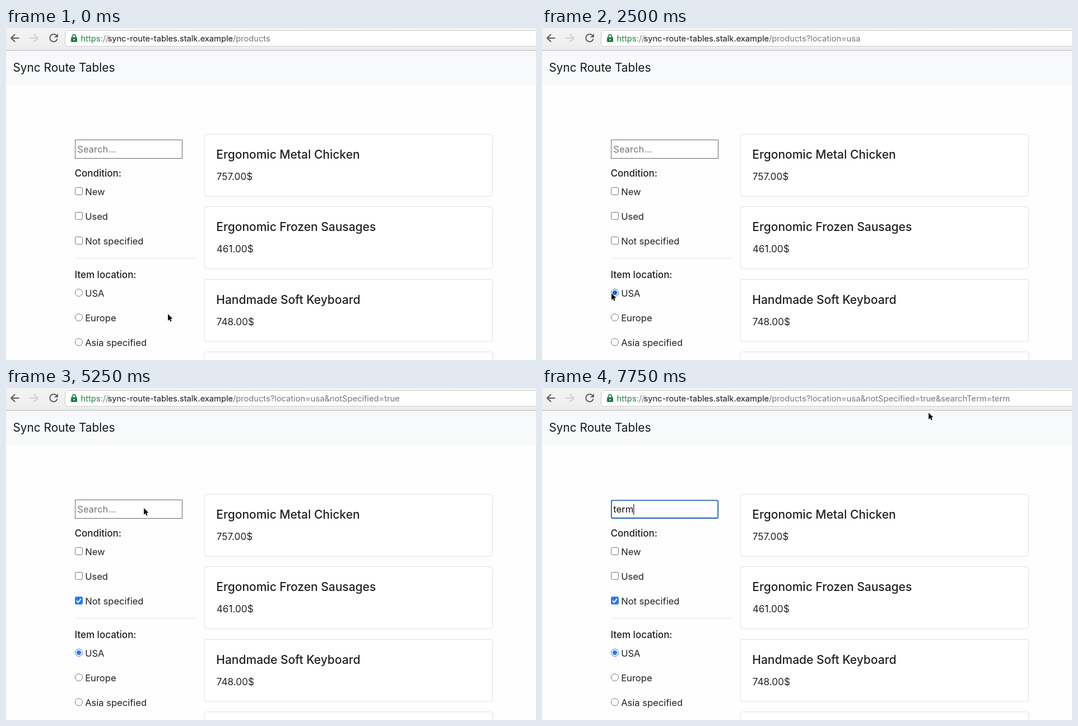
An HTML page that plays this animation: 946 px wide and 592 px high, repeating every 8 s.

```html
<!DOCTYPE html>
<html lang="en">
<head>
<meta charset="utf-8">
<title>Product filter</title>
<style>
  html, body { margin: 0; width: 100%; height: 100%; overflow: hidden; background: #fefefe; }
  svg { display: block; width: 946px; height: 592px; }
  text { font: 400 16.55px Inter, "Open Sans", sans-serif; font-optical-sizing: none; fill: #1d2125; white-space: pre; }
  .url { font-size: 14.66px; fill: #777; }
  .brand { font-size: 20.8px; fill: #151719; }
  .group { font-size: 17px; font-weight: 500; }
  .name { font-size: 21px; font-weight: 500; }
  .price { font-size: 17.2px; }
  .icon { fill: none; stroke: #5b5b5d; stroke-width: 2; }
</style>
</head>
<body>
<svg id="stage" viewBox="0 0 946 592">
  <defs>
    <linearGradient id="bar" x2="0" y2="1">
      <stop stop-color="#f4f3f4"/><stop offset="1" stop-color="#eeedee"/>
    </linearGradient>
  </defs>
  <rect width="946" height="592" fill="#fefefe"/>
  <rect y="40" width="946" height="61" fill="#f7f9fa"/>
  <rect width="946" height="39" fill="url(#bar)"/>
  <rect y="39" width="946" height="1.5" fill="#c9c8ca"/>
  <rect x="105.5" y="4.5" width="860" height="28" rx="4" fill="#fff" stroke="#cbcacb"/>
  <path class="icon" d="M23.5 18H9.5M16 11.2L9.2 18L16 24.8"/>
  <path class="icon" style="stroke:#cfced0" d="M42.5 18H56.5M50 11.2L56.8 18L50 24.8"/>
  <path class="icon" d="M90 13.2A6.7 6.7 0 1 0 91.5 19.5"/>
  <path fill="#5b5b5d" d="M92.8 10V16.8H86Z"/>
  <rect x="116" y="16.5" width="11" height="8.5" rx="1" fill="#1d8045"/>
  <path d="M118.5 17V14.8a3 3 0 0 1 6 0V17" fill="none" stroke="#1d8045" stroke-width="1.7"/>
  <circle cx="121.5" cy="20.7" r="1.2" fill="#fff"/>
  <text class="url" x="133.5" y="24"><tspan fill="#1d8045">https</tspan>://</text>
  <text class="url" x="405" y="24" text-anchor="end" style="fill:#161616">sync-route-tables.stalk.example</text>
  <text class="url" id="path" x="405" y="24"></text>
  <text class="brand" x="12.5" y="78.3">Sync Route Tables</text>

  <rect id="field" fill="#fff"/>
  <text id="term" x="127.3" y="222"></text>
  <rect id="caret" y="207" width="1.2" height="19" fill="#111"/>

  <text class="group" x="122.5" y="265.2">Condition:</text>
  <path d="M123 410.5H342" stroke="#e2e2e3"/>
  <text class="group" x="122.5" y="446.2">Item location:</text>
  <g id="choices"></g>
  <g id="cards"></g>
  <path id="cursor" d="M0 1V13L2.8 10.4L4.6 14.6L6.6 13.8L4.8 9.6H8.5Z" fill="#0a0a0a" stroke="#fff" stroke-width="1.4" paint-order="stroke" stroke-linejoin="round"/>
</svg>
<script>
const LOOP = 8000;
const $ = id => document.getElementById(id);

function add(parent, tag, attrs, content = '') {
  const el = document.createElementNS('http://www.w3.org/2000/svg', tag);
  set(el, attrs);
  el.textContent = content;
  return parent.appendChild(el);
}
function set(el, attrs) {
  for (const key in attrs) el.setAttribute(key, attrs[key]);
}

const products = [
  ['Ergonomic Metal Chicken', '757.00$'],
  ['Ergonomic Frozen Sausages', '461.00$'],
  ['Handmade Soft Keyboard', '748.00$'],
  ['', '']
];
products.forEach(([name, price], i) => {
  const y = Math.round(189 + i * 129.4);
  const cards = $('cards');
  add(cards, 'rect', { x: 354, y: y + .5, width: 514.5, height: 110.5, rx: 4, fill: '#fff', stroke: '#dedfe0' });
  add(cards, 'text', { class: 'name', x: 375.3, y: y + 44.2 }, name);
  add(cards, 'text', { class: 'price', x: 375.7, y: y + 81.7 }, price);
});

function choice(label, y, round) {
  const g = $('choices');
  const box = round
    ? add(g, 'circle', { cx: 130, cy: y, r: 6.5 })
    : add(g, 'rect', { x: 123.5, y: y - 6.5, width: 13, height: 13, rx: 2 });
  const mark = round
    ? add(g, 'circle', { cx: 130, cy: y, r: 4.1 })
    : add(g, 'path', { d: `M126 ${y + .3}l2.8 2.9l5-6.4`, fill: 'none', stroke: '#fff', 'stroke-width': 2 });
  add(g, 'text', { x: 141.2, y: y + 7 }, label);
  return (checked, x, cursorY) => {
    const hover = Math.hypot(x - 130, cursorY - y) < 9;
    const blue = hover ? '#1a5cc8' : '#2a78f6';
    set(box, {
      fill: checked && !round ? blue : '#fff',
      stroke: checked ? blue : hover ? '#4f4f4f' : '#777'
    });
    if (round) mark.setAttribute('fill', blue);
    mark.setAttribute('visibility', checked ? 'visible' : 'hidden');
  };
}
const conditions = ['New', 'Used', 'Not specified'].map((s, i) => choice(s, 291 + 44 * i, false));
const locations = ['USA', 'Europe', 'Asia specified'].map((s, i) => choice(s, 472 + 44 * i, true));

// Each step: time, cursor x, cursor y, and whatever else changes then.
const steps = [
  [0, 289, 509, { query: '', place: -1, unspecified: false, focus: false, caret: false, term: '' }],
  [250, 268, 514],
  [500, 205, 520],
  [750, 141, 521],
  [1000, 120, 518],
  [1250, 125, 517, { place: 1 }],
  [1500, 125, 516, { query: '?location=europe' }],
  [1750, 125, 498],
  [2000, 124, 475],
  [2250, 124, 472, { place: 0 }],
  [2500, 124, 472, { query: '?location=usa' }],
  [3000, 126, 452],
  [3250, 127, 408],
  [3500, 126, 382],
  [3750, 126, 381, { unspecified: true }],
  [4000, 126, 381, { query: '?location=usa&notSpecified=true' }],
  [4250, 352, 178],
  [4500, 564, 32],
  [4750, 627, 36],
  [5000, 400, 138],
  [5250, 246, 213],
  [5500, 246, 213, { focus: true, caret: true }],
  [5750, 246, 213, { caret: false }],
  [6250, 246, 213, { term: 't', caret: true }],
  [6500, 246, 213, { term: 'ter' }],
  [6750, 246, 213, { term: 'term', query: '?location=usa&notSpecified=true&searchTerm=term' }],
  [7250, 400, 192, { caret: false }],
  [7500, 590, 92],
  [7750, 690, 43, { caret: true }]
];

let shown = -1;
function render(time) {
  const index = steps.findLastIndex(step => step[0] <= time);
  if (index === shown) return;
  shown = index;
  const state = Object.assign({}, ...steps.slice(0, index + 1).map(step => step[3]));
  const [, x, y] = steps[index];

  $('path').textContent = '/products' + state.query;
  $('cursor').setAttribute('transform', `translate(${x} ${y})`);
  conditions.forEach((draw, i) => draw(i === 2 && state.unspecified, x, y));
  locations.forEach((draw, i) => draw(i === state.place, x, y));

  set($('field'), state.focus
    ? { x: 123.9, y: 200.4, width: 190.3, height: 31.6, rx: 1.5, stroke: '#2160ba', 'stroke-width': 1.8 }
    : { x: 123.5, y: 199.5, width: 191, height: 33, rx: 0, stroke: '#717171', 'stroke-width': 1.1 });
  const term = $('term');
  term.textContent = state.term || 'Search...';
  term.style.fill = state.term ? '#0c0c0c' : '#757575';
  set($('caret'), {
    x: 127.3 + (state.term ? term.getComputedTextLength() : 0),
    visibility: state.caret ? 'visible' : 'hidden'
  });
}

const start = performance.now();
function tick() {
  render((performance.now() - start) % LOOP);
  requestAnimationFrame(tick);
}
tick();
</script>
</body>
</html>
```
